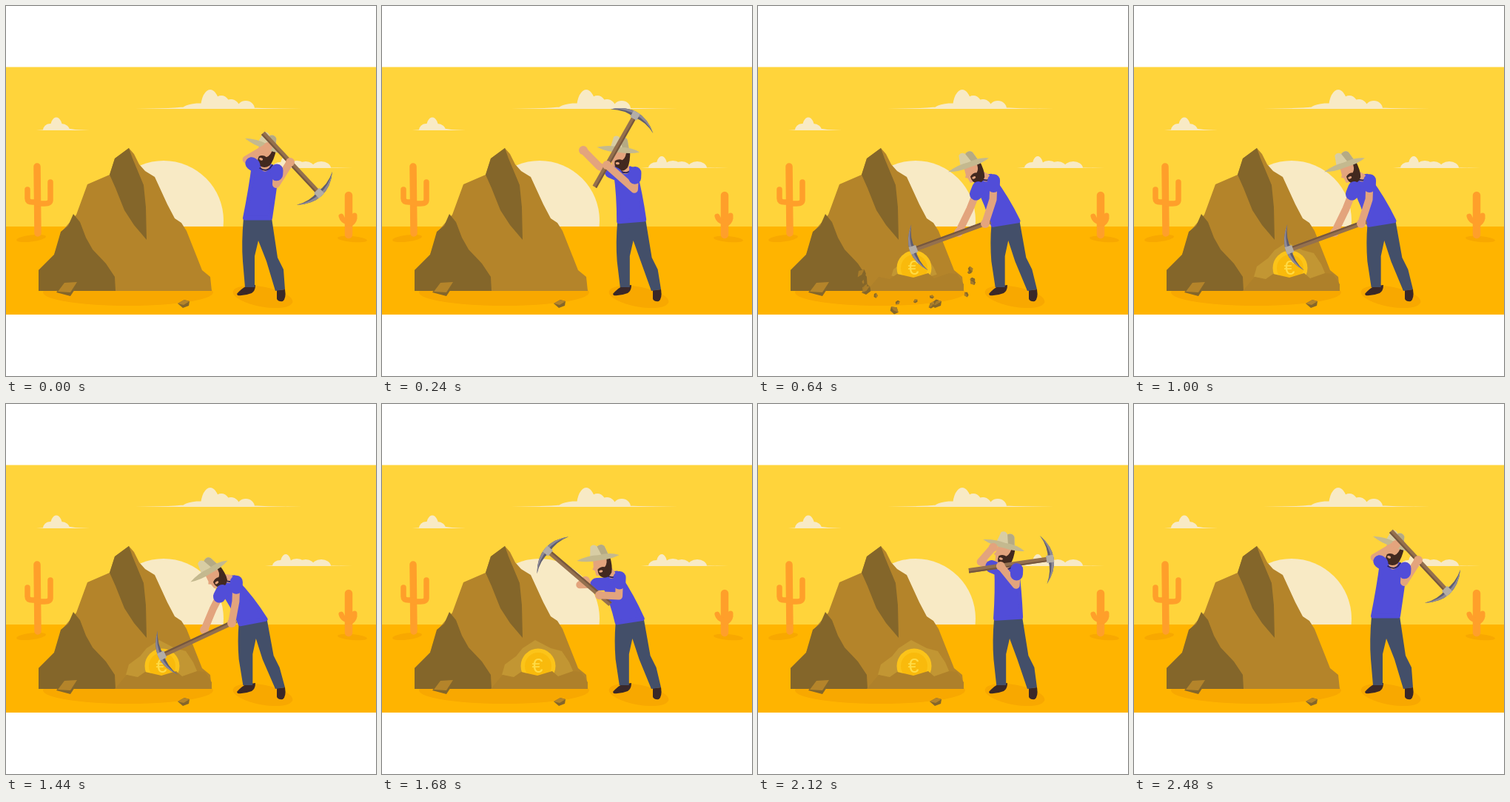
Recreate the animation shown at these times as an HTML page. Size 500 px wide and 500 px high, loop 2.52 s.

```html
<!DOCTYPE html>
<html lang="en">
<head>
<meta charset="utf-8">
<title>Miner in the desert</title>
<style>
html, body { margin: 0; width: 100%; height: 100%; overflow: hidden; background: #fff; }
svg { display: block; width: 100%; height: 100%; }
.round { fill: none; stroke-linecap: round; stroke-linejoin: round; }
</style>
</head>
<body>
<svg viewBox="0 0 500 500">
  <defs><clipPath id="scene"><rect y="82.4" width="500" height="334.6"/></clipPath></defs>
  <g clip-path="url(#scene)">
    <rect y="82" width="500" height="217" fill="#ffd43b"/>
    <circle cx="213" cy="290" r="81" fill="#f8eac5"/>
    <rect y="298" width="500" height="120" fill="#ffb400"/>
    <g id="clouds" fill="#f8eac5"></g>
    <g fill="#f8a800">
      <ellipse cx="34" cy="314" rx="20" ry="4.5" transform="rotate(-7 34 314)"/>
      <ellipse cx="468" cy="315" rx="20" ry="4" transform="rotate(5 468 315)"/>
      <ellipse cx="165" cy="387" rx="115" ry="18"/>
      <ellipse cx="347" cy="393" rx="41" ry="13.5" transform="rotate(10 347 393)"/>
    </g>
    <g class="round" stroke="#ff9f2a">
      <path stroke-width="9.5" d="M42 217L43 307"/>
      <path stroke-width="7.5" d="M29 248V260Q29 265 36 265H42M60 238V262Q60 267 52 267H42"/>
      <path stroke-width="10.5" d="M463 256V309"/>
      <path stroke-width="7" d="M453 284Q455 291 462 292M471 283V287Q470 293 463 296"/>
    </g>

    <path fill="#b4842a" d="M166 192L173 200L180 214L188 223L201 231L218 268L228 287L237 293L244 304L265 357L276 366L278 385H44V357L65 336L76 304L95 282L110 241L140 228L147 206Z"/>
    <g fill="#84662a">
      <path d="M166 192L171 206L186 242L189 272L190 316L173 296L160 276L148 246L140 228L147 206Z"/>
      <path d="M91 281L100 292L108 313L117 329L135 348L147 366L148 385H44V357L65 336L74 305L84 297Z"/>
    </g>
    <g id="hole">
      <path id="pit" fill="#c29633" d="M162 366L166 352L181 341L190 330L207 319L228 330L243 334L253 349L259 363L238 370H178Z"/>
      <g id="coin">
        <circle cx="211" cy="354" r="23.5" fill="#fcc419"/>
        <circle cx="211" cy="354" r="18" fill="#f9ba0c"/>
        <text x="210" y="363" text-anchor="middle" font-family="'Liberation Sans', Arial, sans-serif" font-size="27" fill="#ffdb45">€</text>
      </g>
      <path id="mound" fill="#ae802a" d="M147 385L163 366L178 369L188 362L210 367L230 361L238 368L258 361L269 362L278 376V385Z"/>
    </g>
    <path fill="#84662a" d="M68 387L79 374L96 373L95 380L87 392Z"/>
    <path fill="#b4842a" d="M70 386L79 374L96 373L87 387Z"/>
    <path fill="#84662a" d="M232 402L241 397L248 399L247 405L239 408Z"/>
    <path fill="#b4842a" d="M232 402L241 397L248 399L240 404Z"/>
    <g id="chips"></g>

    <g fill="#3a2828">
      <path d="M312 389Q318 382 324 379L337 377Q337 385 332 388Q322 392 313 391Z"/>
      <path d="M366 384L377 383Q379 395 374 399Q365 400 366 393Z"/>
    </g>
    <path id="legs" fill="#434f69"/>
    <path id="torso" fill="#514dd8" stroke="#514dd8" stroke-width="6" stroke-linejoin="round"/>
    <path id="neck" class="round" stroke="#e3a47d" stroke-width="11"/>
    <path id="collar" class="round" stroke="#2d2560" stroke-width="2"/>
    <g id="head">
      <path fill="#e3a47d" d="M-8 1L-9 12L-11 15L-8 17L-7 24L8 26L15 14L14 0Z"/>
      <path fill="#42291f" d="M10 0H15Q17 15 14 23Q9 30 2 28Q-5 25 -4 16Q1 12 6 14Q11 10 10 0Z"/>
      <ellipse cx="0" cy="19" rx="2.6" ry="1.6" fill="#e3a47d"/>
      <path fill="#d8cda4" d="M-12 0L-9 -16Q-4 -20 0 -15Q6 -19 10 -14L14 0Z"/>
      <path fill="#b5aa84" d="M0 -15Q6 -19 10 -14L14 0H5Z"/>
      <path fill="#c4b98f" d="M-30 0Q-14 -5 0 -3Q16 -5 28 1Q16 5 0 4Q-16 5 -30 0Z"/>
    </g>
    <g id="backArm"></g>
    <g id="pick">
      <rect y="-3.2" width="112" height="6.4" fill="#94704e"/>
      <rect y="1" width="112" height="2.2" fill="#76573e"/>
      <path fill="#5f5d70" d="M102 -33Q116 -17 116 0Q116 17 102 33Q111 16 108 0Q111 -16 102 -33Z"/>
      <path fill="#8d8996" d="M102 -33Q116 -17 116 0Q116 17 102 33Q113 16 112 0Q113 -16 102 -33Z"/>
      <rect x="106" y="-5" width="10" height="10" fill="#b3ada6"/>
    </g>
    <g id="frontArm"></g>
  </g>
</svg>
<script>
const LOOP = 2520, HIT = 540, REST = 1220, RAD = Math.PI / 180;
const $ = id => document.getElementById(id);
const clamp = v => Math.max(0, Math.min(1, v));
const set = (el, attrs) => { for (const k in attrs) el.setAttribute(k, attrs[k]); };
const along = (p, q, f) => [p[0] + (q[0] - p[0]) * f, p[1] + (q[1] - p[1]) * f];
const shift = (p, x, y) => [p[0] + x, p[1] + y];

function add(parent, tag, attrs) {
  const el = document.createElementNS('http://www.w3.org/2000/svg', tag);
  set(el, attrs);
  return parent.appendChild(el);
}

let seed = 11;
const rnd = () => (seed = seed * 16807 % 2147483647) / 2147483647;

// flat wings from x0 to x1 with half-ellipse bumps [x, radius, height]
function cloud(x0, x1, y, ...bumps) {
  const cx = bumps[0][0];
  let d = `M${x0} ${y}Q${cx} ${y - 1} ${cx} ${y - 12}Q${cx} ${y - 1} ${x1} ${y}Z`;
  for (const [x, r, h] of bumps) d += `M${x - r} ${y}A${r} ${h} 0 0 1 ${x + r} ${y}Z`;
  add($('clouds'), 'path', { d });
}
cloud(175, 400, 139, [276, 13, 26], [291, 13, 18], [270, 32, 8], [304, 12, 13], [324, 12, 11]);
cloud(41, 113, 168, [68, 9, 17.5], [75, 11, 9], [59, 9, 9]);
cloud(350, 468, 219, [378, 8, 16], [371, 11, 8], [393, 13, 10], [405, 12, 9], [426, 13, 9]);

// The body follows from lean, head tilt, both hands and the pick's angle.
const pose = (lean, tilt, backX, backY, frontX, frontY, angle) => ({ lean, tilt, backX, backY, frontX, frontY, angle });
const ready = pose(0, 20, 354, 190, 384, 211, 47);
const swing = pose(.47, 6, 272, 195, 304, 215, -60);
const strike = pose(.93, -20, 271, 306, 307, 294, -200);
const pull = pose(1.07, -31, 268, 305, 305, 296, -205);
const lift = pose(.69, 6, 284, 201, 289, 233, -83);

const down = [[0, ready], [240, swing], [HIT, strike]];
const up = [[REST, strike], [1440, pull], [1840, lift], [2480, ready]];

// monotone cubic through the keys; `hard` keeps speed at the last key
function sample(keys, t, name, hard) {
  const last = keys.length - 1, time = k => keys[k][0], value = k => keys[k][1][name];
  if (t >= time(last)) return value(last);
  let n = 0;
  while (t >= time(n + 1)) n++;
  const slope = k => (value(k + 1) - value(k)) / (time(k + 1) - time(k));
  const tangent = k => {
    if (k === 0) return 0;
    if (k === last) return hard ? slope(k - 1) : 0;
    const a = slope(k - 1), b = slope(k);
    return a * b <= 0 ? 0 : 2 * a * b / (a + b);
  };
  const d = time(n + 1) - time(n), s = (t - time(n)) / d, r = 1 - s;
  return value(n) * r * r * (1 + 2 * s) + value(n + 1) * s * s * (3 - 2 * s)
    + d * s * r * (tangent(n) * r - tangent(n + 1) * s);
}

function makeArm(group) {
  const skin = add(group, 'path', { class: 'round', stroke: '#e3a47d', 'stroke-width': 10 });
  const fist = add(group, 'circle', { r: 6, fill: '#e3a47d' });
  const sleeve = add(group, 'path', { class: 'round', stroke: '#514dd8', 'stroke-width': 17 });
  return (shoulder, elbow, hand) => {
    set(skin, { d: `M${shoulder}L${elbow}L${hand}` });
    set(fist, { cx: hand[0], cy: hand[1] });
    set(sleeve, { d: `M${shoulder}L${along(shoulder, elbow, .3)}` });
  };
}
const backArm = makeArm($('backArm')), frontArm = makeArm($('frontArm'));

function drawMiner(t) {
  const p = {};
  for (const name in ready) p[name] = t < REST ? sample(down, t, name, true) : sample(up, t, name, false);
  const u = p.lean, knee = -5 * u, ankle = -2.5 * u;
  const neck = [350 - 45 * u, 218 + 16 * u * u];
  const hip = [340 - 6 * u, 285.5 + 7 * u];
  const hipL = shift(hip, -17, 1 + 3 * u), hipR = shift(hip, 17, 1 - 3 * u);
  const rear = shift(neck, -15 + 5 * u, 18 * u - 3), near = shift(neck, 16 - 6 * u, 4);

  set($('legs'), { d: `M${shift(hipL, -2, 0)}Q${318 + knee} 320 ${320 + knee} 345L${323 + ankle} 380H${336 + ankle}`
    + `L${336 + knee * .5} 338L${341 + knee * .6} 317L${352 + knee} 345L364 385L377 383`
    + `L${375 + knee} 356L${367 + knee} 340L${shift(hipR, 2, 0)}Z` });
  set($('torso'), { d: `M${rear}L${shift(neck, -6, 0)}L${shift(neck, 7, -2)}L${near}`
    + `Q${shift(along(near, hipR, .5), 1, -4)} ${hipR}L${hipL}Q${shift(along(rear, hipL, .5), 2, -4)} ${rear}Z` });

  const dir = (1.36 * p.tilt - 25) * RAD, tilt = p.tilt * RAD;
  const head = shift(neck, 29 * Math.sin(dir), -29 * Math.cos(dir));
  const nape = shift(head, 9 * Math.cos(tilt) - 17 * Math.sin(tilt), 9 * Math.sin(tilt) + 17 * Math.cos(tilt));
  set($('head'), { transform: `translate(${head}) rotate(${p.tilt})` });
  set($('neck'), { d: `M${nape}L${neck}` });
  set($('collar'), { d: `M${shift(neck, -7, 1)}Q${shift(neck, 3, 8)} ${shift(neck, 10, -3)}` });

  const backHand = [p.backX, p.backY], frontHand = [p.frontX, p.frontY];
  const reach = Math.hypot(backHand[0] - rear[0], backHand[1] - rear[1]);
  backArm(rear, shift(along(rear, backHand, .42), Math.min(0, (reach - 62) * .6), 3), backHand);
  frontArm(near, shift(near, -1, 19 + 7 * u), frontHand);
  const grip = 45 + .186 * p.angle;
  set($('pick'), { transform: `translate(${frontHand}) rotate(${p.angle}) translate(${-grip} 0)` });
}

const chips = Array.from({ length: 18 }, () => {
  const el = add($('chips'), 'g', {});
  add(el, 'path', { fill: '#84662a', d: 'M-6 1L-1 -5L6 -3L5 3L-2 5Z' });
  add(el, 'path', { fill: '#a87c2a', d: 'M-6 1L-1 -5L6 -3L0 1Z' });
  const a = (rnd() * 220 - 20) * RAD;
  return { el, dx: 75 * Math.cos(a), dy: 28 + (20 + 25 * rnd()) * Math.sin(a) - 10 * rnd(), size: .5 + .6 * rnd() ** 2, turn: 360 * rnd() };
});

function drawRock(t) {
  const zoom = k => `translate(212 362) scale(${k}) translate(-212 -362)`;
  set($('hole'), { opacity: t < HIT ? 0 : 1 - clamp((t - 2280) / 160) });
  set($('pit'), { transform: zoom(clamp((t - HIT) / 160)) });
  set($('coin'), { transform: zoom(clamp((t - HIT) / 60)) });
  set($('mound'), { opacity: clamp((t - HIT) / 80) });

  const k = (t - HIT) / 100, flying = k > 0 && k < 4.6;
  set($('chips'), { visibility: flying ? 'visible' : 'hidden' });
  if (!flying) return;
  for (const { el, dx, dy, size, turn } of chips) {
    const x = 215 + dx * k ** .6, y = 345 + dy * k + 14 * (k * k - k);
    set(el, { transform: `translate(${x} ${y}) rotate(${turn + 50 * k}) scale(${size})` });
  }
}

function frame(now) {
  const t = now % LOOP;
  drawMiner(t);
  drawRock(t);
  requestAnimationFrame(frame);
}
frame(0);
</script>
</body>
</html>
```
